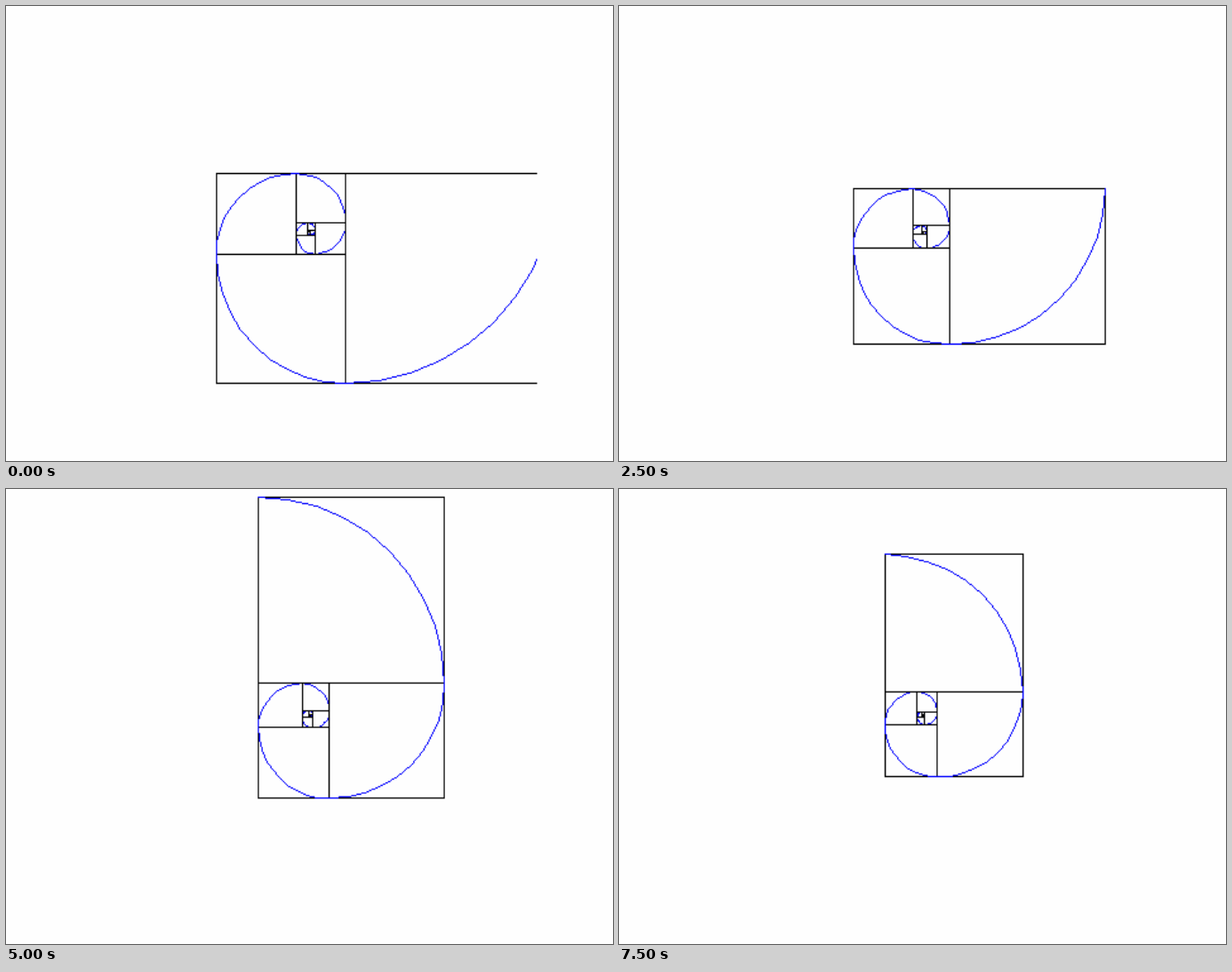
An HTML page with a canvas for the animation above (8 s loop, 683 px wide and 512 px high).

```html
<!DOCTYPE html>
<html lang="en">
<head>
<meta charset="utf-8">
<title>Golden spiral</title>
<style>
  html, body { margin: 0; width: 100%; height: 100%; overflow: hidden; background: #fefefe; }
  canvas { display: block; width: 683px; height: 512px; }
</style>
</head>
<body>
<canvas id="stage" width="683" height="512"></canvas>
<script>
const PHI = (1 + Math.sqrt(5)) / 2;
const STEP = 500, STEPS = 16;
const GRID_W = 480, GRID_H = 360;  // coarse pixel grid, enlarged to the stage
const SIDE = 166;                  // side of square 0 at the first step
const SMALLEST = 10;

// Square 0 relative to the spiral's pole, for a side of 1
const LEFT = PHI * PHI * PHI / (1 + PHI * PHI) - 1;
const TOP = -1 / (1 + PHI * PHI);
const CORNERS = [[0, 0], [1, 0], [1, 1], [0, 1], [0, 0]];
const ARC = Array.from({ length: 11 }, (_, i) => {
  const a = i * Math.PI / 20;
  return [Math.cos(a), Math.sin(a)];
});

const view = document.getElementById('stage').getContext('2d');
const grid = document.createElement('canvas');
grid.width = GRID_W;
grid.height = GRID_H;
const g = grid.getContext('2d');
g.beginPath();
g.rect((GRID_W - GRID_H) / 2, 0, GRID_H, GRID_H);
g.clip();

// Hard-edged one pixel line
function line(x0, y0, x1, y1) {
  const dx = x1 - x0, dy = y1 - y0;
  const n = Math.max(Math.abs(dx), Math.abs(dy), 1);
  for (let i = 0; i <= n; i++) {
    g.fillRect(Math.round(x0 + dx * i / n), Math.round(y0 + dy * i / n), 1, 1);
  }
}

function polyline(points, place, color) {
  g.fillStyle = color;
  const p = points.map(place);
  for (let i = 1; i < p.length; i++) line(...p[i - 1], ...p[i]);
}

// Each square is the previous one turned a quarter and shrunk by PHI
function square(index, zoom) {
  const size = SIDE * zoom * PHI ** -index;
  const turn = (index + 4) % 4;
  const cos = [1, 0, -1, 0][turn], sin = [0, 1, 0, -1][turn];
  const poleX = 240.25, poleY = 179.73 - 1.2 * zoom;
  const place = ([u, v]) => {
    const x = (LEFT + u) * size, y = (TOP + v) * size;
    return [Math.floor(poleX + x * cos - y * sin), Math.floor(poleY + x * sin + y * cos)];
  };
  polyline(CORNERS, place, '#000');
  polyline(ARC, place, '#00f');
}

function draw(step) {
  g.fillStyle = '#fefefe';
  g.fillRect(0, 0, GRID_W, GRID_H);
  const zoom = PHI ** (-step / 8);
  const largest = step < 8 ? 0 : -1;
  for (let i = SMALLEST; i >= largest; i--) square(i, zoom);
  view.fillStyle = '#fefefe';
  view.fillRect(0, 0, 683, 512);
  view.drawImage(grid, 0, 0, 683, 512);
}

let shown = -1, start = null;
function tick(now) {
  if (start === null) start = now;
  const step = Math.floor(Math.max(0, now - start) / STEP) % STEPS;
  if (step !== shown) draw(shown = step);
  requestAnimationFrame(tick);
}
draw(0);
requestAnimationFrame(tick);
</script>
</body>
</html>
```
